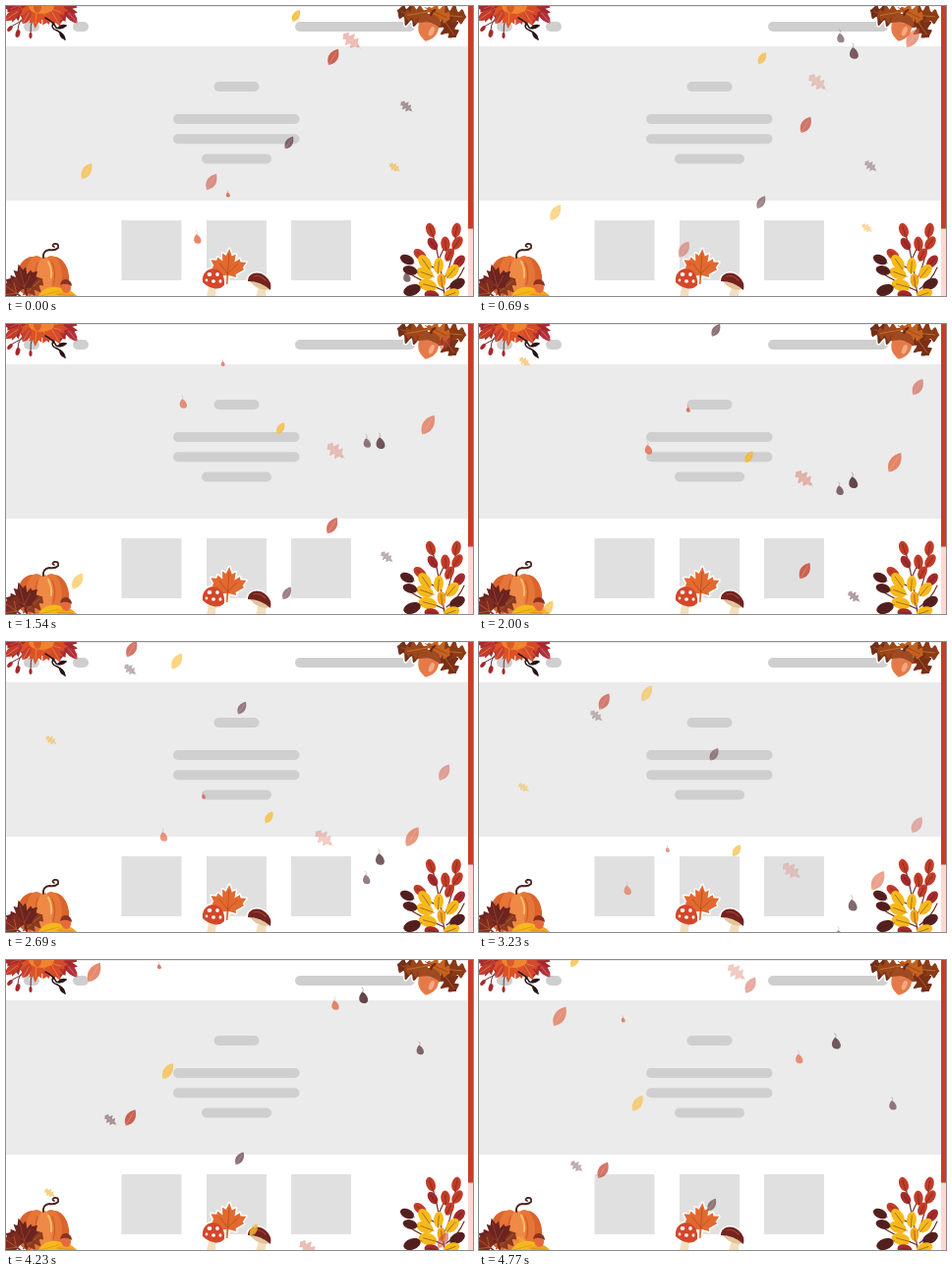
An HTML page with a canvas for the animation above (4.85 s loop, 475 by 295 pixels).

```html
<!DOCTYPE html>
<html lang="en">
<head>
<meta charset="utf-8">
<title>Falling autumn leaves</title>
<style>
html, body { margin: 0; width: 100%; height: 100%; overflow: hidden; background: #fff; }
canvas { display: block; width: 475px; height: 295px; }
</style>
</head>
<body>
<canvas id="stage" width="475" height="295"></canvas>
<script>
const ctx = document.getElementById('stage').getContext('2d');
const LOOP = 4850, STEP = LOOP / 63;
const RED = '#c23c28', CRIMSON = '#a52a2c', ORANGE = '#e2692f', YELLOW = '#f6b91c', DARK = '#54201f';
let halo = 0;

// While a halo is set, shapes are traced in white to form a sticker edge.
function paint(path, color) {
  if (halo) {
    ctx.strokeStyle = '#fff';
    ctx.lineWidth = halo * 2;
    ctx.lineJoin = 'round';
    ctx.stroke(path);
  } else {
    ctx.fillStyle = color;
    ctx.fill(path);
  }
}

function line(d, color, width = 1) {
  ctx.strokeStyle = halo ? '#fff' : color;
  ctx.lineWidth = width + halo * 2;
  ctx.lineCap = 'round';
  ctx.stroke(new Path2D(d));
}

const shape = (d, color) => paint(new Path2D(d), color);

function ellipse(x, y, rx, ry, color, angle = 0) {
  const p = new Path2D();
  p.ellipse(x, y, rx, ry, angle * Math.PI / 180, 0, Math.PI * 2);
  paint(p, color);
}

function placed(x, y, angle, draw) {
  ctx.save();
  ctx.translate(x, y);
  ctx.rotate(angle * Math.PI / 180);
  draw();
  ctx.restore();
}

function sticker(draw, width = 1.5) {
  halo = width;
  draw();
  halo = 0;
  draw();
}

function pill(x, y, w) {
  ctx.fillStyle = '#cfcfcf';
  ctx.beginPath();
  ctx.roundRect(x, y, w, 10, 5);
  ctx.fill();
}

function leaf(x, y, len, width, angle, color, vein = 'rgba(255,225,205,.5)') {
  placed(x, y, angle, () => {
    const h = len / 2, a = width * .5, b = width * .82;
    shape(`M0 ${-h}C${a} ${-h * .5} ${b} ${h * .3} 0 ${h}C${-b} ${h * .3} ${-a} ${-h * .5} 0 ${-h}Z`, color);
    if (!halo) line(`M0 ${-h * .6}L0 ${h * 1.1}`, vein, .6);
  });
}

function oak(x, y, len, angle, color, vein = 'rgba(255,240,230,.5)', spread = .36) {
  placed(x, y, angle, () => {
    const p = new Path2D(), n = 48;
    for (let i = 0; i <= 2 * n; i++) {
      const right = i <= n, u = (right ? i : 2 * n - i) / n;
      const r = len * spread * Math.sin(Math.PI * u) ** .7 * (.7 - .3 * Math.cos(u * Math.PI * 7));
      p.lineTo(right ? r : -r, len * (u - .5));
    }
    p.closePath();
    paint(p, color);
    line(`M0 ${len * .4}L0 ${len * .58}`, color, len * .04);
    if (!halo) line(`M0 ${-len * .35}L0 ${len * .48}`, vein, .6);
  });
}

const mapleHalf = [[0, -1], [.17, -.6], [.38, -.72], [.34, -.28], [.62, -.48], [.68, -.3], [1, -.3],
  [.82, 0], [.9, .12], [.45, .42], [.5, .58], [.06, .5], [.04, 1]];

function maple(x, y, r, angle, color, vein) {
  placed(x, y, angle, () => {
    const left = mapleHalf.map(([a, b]) => [-a, b]).reverse();
    const p = new Path2D();
    for (const [a, b] of mapleHalf.concat(left)) p.lineTo(a * r, b * r);
    p.closePath();
    paint(p, color);
    if (!halo) {
      const k = r * .5;
      line(`M0 ${k}V${-k * 1.4}M0 ${k * .8}L${k} ${-k * .3}M0 ${k * .8}L${-k} ${-k * .3}`, vein, .6);
    }
  });
}

function drop(x, y, size, color) {
  placed(x, y, 0, () => {
    const s = size / 2;
    line(`M${-s * .15} ${-s}Q${s * .1} ${-s * 1.4} ${-s * .3} ${-s * 1.8}`, color, .4);
    shape(`M${-s * .3} ${-s}C${s * .6} ${-s * .8} ${s * 1.3} ${s} ${s * .1} ${s}C${-s * 1.1} ${s} ${-s} ${-s * .3} ${-s * .3} ${-s}Z`, color);
  });
}

function page() {
  ctx.fillStyle = '#fff';
  ctx.fillRect(0, 0, 475, 295);
  ctx.fillStyle = '#ebebeb';
  ctx.fillRect(0, 0, 470, 1);
  ctx.fillRect(0, 41, 470, 157);
  pill(18, 16, 16);
  pill(68, 16, 16);
  pill(294, 16, 122);
  pill(211.5, 77, 46);
  pill(170, 110, 128.5);
  pill(170, 130.3, 128.5);
  pill(199, 150.5, 71);
  ctx.fillStyle = '#e0e0e0';
  for (const x of [117.5, 204, 290]) ctx.fillRect(x, 218, 61, 61);
  ctx.fillStyle = '#fdd8d3';
  ctx.fillRect(470, 0, 5, 295);
  ctx.fillStyle = '#c63d2b';
  ctx.fillRect(470, 0, 5, 226.5);
}

function topLeft() {
  line('M22 8Q12 14 12 25M16 15L5 21M28 10Q24 20 25 31', DARK, .9);
  ellipse(12, 28, 2.3, 4, CRIMSON, 15);
  ellipse(4, 23, 2, 3.5, CRIMSON, 40);
  ellipse(25, 30, 1.6, 3, CRIMSON);
  maple(61, 4, 15, 130, CRIMSON, '#cf5a43');
  leaf(67, 11, 17, 7, -40, '#b3303a');
  maple(12, 4, 14, 205, CRIMSON, '#d96a42');
  leaf(7, 9, 20, 9, 55, RED);
  maple(48, 8, 15, 150, '#d44a2b', '#f0954c');
  maple(31, 6, 17, 185, '#dc5226', '#f6a04c');
  leaf(21, 11, 17, 8, 30, '#c9402a');
  ellipse(36, 0, 13, 8, '#ef8432');
  ellipse(32, 0, 4, 7, '#d85c28');
  line('M40 12Q48 16 51 22Q55 24 61 20M48 17Q45 23 52 25Q58 28 60 34', '#2a1416', 1.6);
  leaf(57, 21, 10, 4, 70, '#2a1416', '#2a1416');
  leaf(57, 30, 10, 4, -35, '#2a1416', '#2a1416');
}

function topRight() {
  oak(412, 9, 30, -72, '#71301a', '#b7652f', .42);
  oak(453, 10, 31, 95, '#8a3b16', '#d38a42', .42);
  oak(450, 21, 27, 145, '#7a2f16', '#c77738', .42);
  oak(440, 8, 26, 115, '#c4621f', '#8a3b16', .42);
  oak(417, 8, 25, -100, '#9c461a', '#d38a42', .4);
  placed(430, 20, 12, () => {
    shape('M-10 -3C-12 8 -6 13 0 16C6 13 12 8 10 -3Z', '#e57a49');
    if (!halo) ellipse(4, 5, 2.4, 5, '#f5a983', 12);
    shape('M-12 0C-13 -9 -6 -12 0 -12C6 -12 13 -9 12 0Q0 -6 -12 0Z', '#a04a22');
    line('M0 -11Q0 -15 3 -17', '#6b2818', 2);
  });
}

function pumpkin() {
  ellipse(25, 275, 14, 20, '#d9642c', 8);
  ellipse(51, 275, 13, 20, '#d9642c', -8);
  ellipse(31, 275, 11, 21, '#e67538');
  ellipse(46, 275, 11, 21, '#e67538');
  ellipse(39, 276, 8, 21, '#ee8946');
  if (!halo) {
    line('M32 261Q28 272 32 284M47 261Q52 272 48 284', '#cb5525', .9);
    line('M43 260Q47 267 46 276', '#f9bb68', 2.2);
  }
  line('M38 256Q37 249 44 248Q50 249 53 246Q54 241 49 242Q46 244 49 245', '#4a221b', 1.8);
  leaf(46, 292, 28, 12, 75, YELLOW, '#d98a1b');
  leaf(62, 294, 20, 10, 95, '#f3a51d', '#d98a1b');
  oak(28, 285, 24, 50, '#8a3a20', '#c9693a', .4);
  maple(17, 279, 17, -15, '#6b2420', '#a8482b');
  maple(6, 289, 14, -55, '#7d2c1f', '#c9693a');
  ellipse(61, 286, 5, 6, '#e56b3d', -15);
  shape('M55 284Q56 277 62 278Q67 280 67 285Q61 281 55 284Z', '#8a3320');
}

function mushrooms() {
  maple(226, 265, 18, 4, ORANGE, '#a9431d');
  shape('M207 282L204 296H213L214 283Z', '#f3dfbf');
  shape('M200 281C199 272 205 267 211 267C219 268 223 275 222 284Q217 289 211 287Q205 286 200 281Z', '#d4472a');
  if (!halo) {
    ellipse(207, 273, 2.3, 2, '#fff');
    ellipse(215, 273, 1.8, 2, '#fff');
    ellipse(211, 280, 2, 1.7, '#fff');
    ellipse(204, 279, 1.3, 1.4, '#fff');
    ellipse(218, 280, 1.5, 1.8, '#fff');
  }
  shape('M258 282L254 296H264L265 285Z', '#f3dfbf');
  shape('M248 280Q256 280 268 288Q257 291 248 280Z', '#e3c39a');
  shape('M246 280C246 271 257 269 264 275Q271 281 269 289Q259 280 246 280Z', '#74231f');
  if (!halo) line('M252 275Q258 273 264 279', '#a34837', 1.2);
}

function berryBranch() {
  line('M446 296Q444 270 434 232M445 279Q454 262 458 231M443 270Q430 264 421 258M446 290Q424 281 407 270M448 288Q460 280 466 266M441 256L447 243', '#6b2420', 1.1);
  const sprigs = [
    [432, 228, 15, -20, RED], [458, 228, 15, 12, RED], [434, 242, 14, -35, CRIMSON], [447, 242, 15, -5, RED],
    [459, 241, 15, 35, RED], [421, 253, 15, -50, RED], [461, 260, 15, 40, CRIMSON], [451, 253, 14, 25, RED],
    [408, 258, 15, -65, DARK], [426, 261, 18, -35, YELLOW], [440, 264, 16, 5, YELLOW], [426, 272, 18, -70, YELLOW],
    [454, 270, 17, 40, YELLOW], [411, 269, 15, -75, DARK], [429, 284, 19, -75, YELLOW], [459, 283, 17, 60, DARK],
    [443, 279, 14, -5, '#f3a51d'], [413, 289, 18, -110, DARK], [453, 293, 17, 70, YELLOW], [433, 294, 15, -80, CRIMSON]
  ];
  for (const [x, y, len, angle, color] of sprigs) {
    ellipse(x, y, len * .31, len / 2, color, angle);
    if (!halo) placed(x, y, angle, () => line(`M0 ${-len * .25}V${len * .55}`, 'rgba(70,25,20,.6)', .7));
  }
}

// Each kind: horizontal and vertical speed in px/s, opacity, drawing.
const kinds = {
  smallYellow: [-10.2, 62.5, .74, (x, y) => leaf(x, y, 14, 7, 32, '#f5b526')],
  yellow: [-6, 60.7, .6, (x, y) => leaf(x, y, 19, 9, 32, '#f8b72d')],
  red: [-.8, 99.5, .74, (x, y) => leaf(x, y, 19, 9.5, 31, '#c5412f')],
  pink: [-.8, 99, .48, (x, y) => leaf(x, y, 19, 9.5, 31, '#cb4838')],
  orange: [-14, 82.8, .66, (x, y) => leaf(x, y, 23, 11, 32, '#df603a')],
  purple: [-1.5, 87.6, .62, (x, y) => leaf(x, y, 15, 7.5, 32, '#5c3038')],
  pinkOak: [-10.4, 61, .34, (x, y) => oak(x, y, 21, -50, '#d6604c')],
  greyOak: [-13, 87.5, .4, (x, y) => oak(x, y, 14, -50, '#552b32')],
  yellowOak: [-.9, 89, .52, (x, y) => oak(x, y, 12, -55, '#f3ad2c')],
  drop: [-17.2, 101.3, .65, (x, y) => drop(x, y, 9.5, '#df5c36')],
  smallDrop: [-17, 101, .68, (x, y) => drop(x, y, 5, '#d94f30')],
  greyDrop: [-.6, 104.5, .62, (x, y) => drop(x, y, 9.5, '#502b31')],
  darkDrop: [-.5, 86.5, .76, (x, y) => drop(x, y, 11.5, '#48242a')]
};

// Kind and position at the start of the loop.
const falling = [
  ['smallYellow', 295, 10], ['smallYellow', 146, -297],
  ['yellow', 82, 168], ['yellow', 190, -144],
  ['pinkOak', 351, 35], ['pinkOak', 311, -279],
  ['red', 333, 52], ['red', 130, -261],
  ['pink', 209, 179], ['pink', 448, -134], ['pink', 280, -447],
  ['orange', 451, -25], ['orange', 149, -338],
  ['purple', 288, 139], ['purple', 244, -169],
  ['greyOak', 407, 102], ['greyOak', 161, -208],
  ['yellowOak', 395, 164], ['yellowOak', 48, -140],
  ['drop', 195, 237], ['drop', 207, -75], ['drop', 408, -383],
  ['smallDrop', 226, 192], ['smallDrop', 247, -115], ['smallDrop', 228, -421],
  ['greyDrop', 408, 276], ['greyDrop', 368.5, -40], ['greyDrop', 424, -351],
  ['darkDrop', 382, -12], ['darkDrop', 366, -328]
];

function drawAt(ms) {
  // The picture advances in 63 equal steps, on a clock that ticks in tens of ms.
  const t = Math.floor((ms % LOOP + 6) / STEP) % 63 * STEP / 1000;
  page();
  topLeft();
  ctx.save();
  ctx.beginPath();
  ctx.rect(0, 0, 470, 295);
  ctx.clip();
  for (const art of [topRight, pumpkin, mushrooms, berryBranch]) sticker(art);
  ctx.restore();
  const pulse = .08 * Math.cos(t * Math.PI * 2 / 2.1);
  for (const [kind, x, y] of falling) {
    const [vx, vy, alpha, draw] = kinds[kind];
    const top = y + vy * t;
    if (top < -20 || top > 315) continue;
    ctx.globalAlpha = alpha + pulse;
    draw(x + vx * t, top);
  }
  ctx.globalAlpha = 1;
}

const start = performance.now();
function tick() {
  drawAt(performance.now() - start);
  requestAnimationFrame(tick);
}
tick();
</script>
</body>
</html>
```
